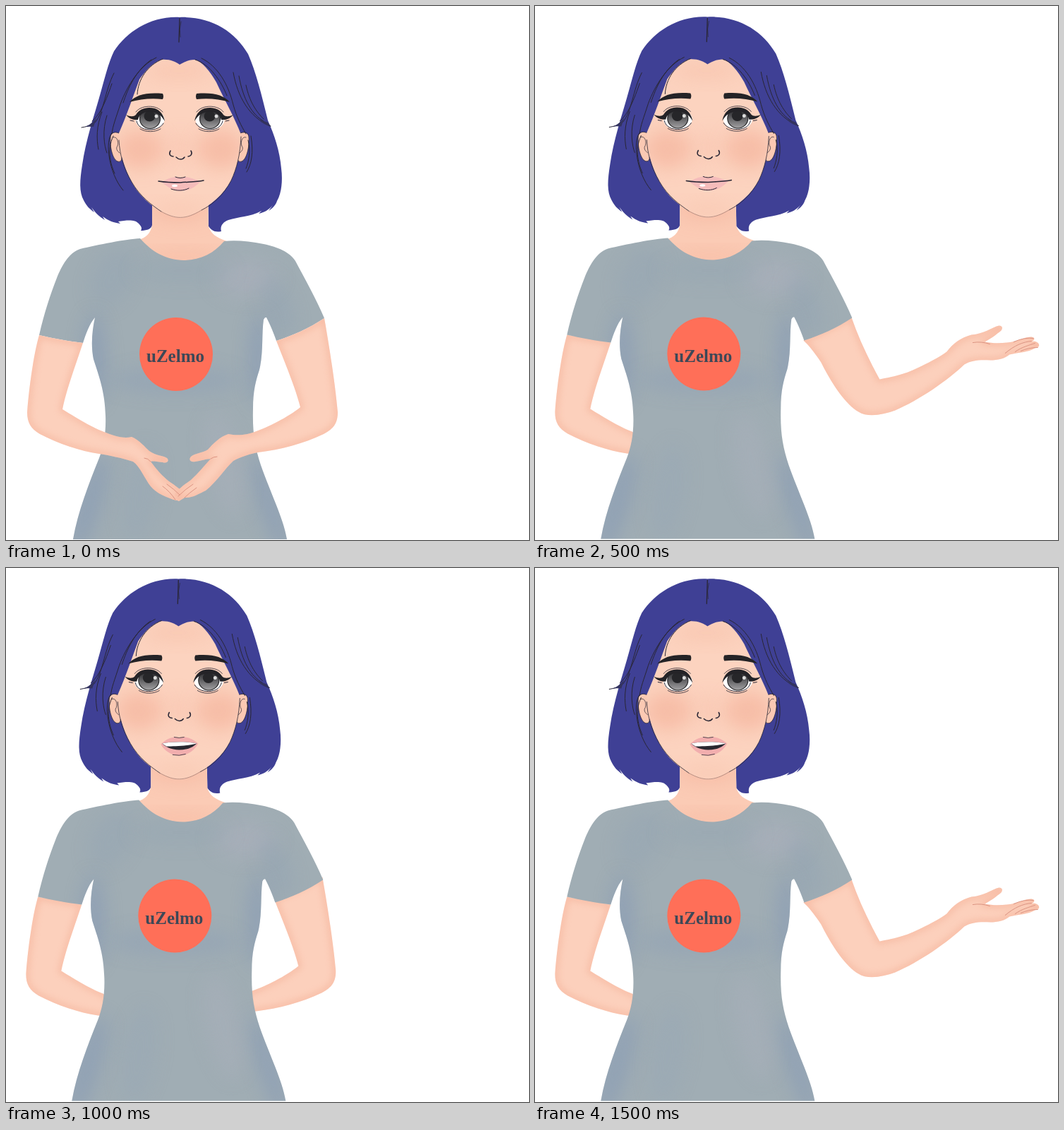
Animation of 741 by 756 pixels, one loop 1750 ms. Source, as an HTML page:

```html
<!DOCTYPE html>
<html lang="en">
<head>
<meta charset="utf-8">
<title>Presenter</title>
<style>
html, body { margin: 0; width: 100%; height: 100%; overflow: hidden; background: #fff; }
svg { display: block; width: 100%; height: 100%; }
.line { fill: none; stroke: #292634; stroke-linecap: round; stroke-linejoin: round; }
.crease { fill: none; stroke: #dc9482; stroke-width: 1; stroke-linecap: round; }
</style>
</head>
<body>
<svg id="stage" viewBox="0 0 741 756" preserveAspectRatio="none"></svg>
<script>
const stage = document.getElementById('stage');
const MIRROR = 'translate(492 0) scale(-1 1)';

const line = (d, width = 1) => `<path class="line" d="${d}" stroke-width="${width}"/>`;
const crease = d => `<path class="crease" d="${d}"/>`;
const fill = (d, color) => `<path d="${d}" fill="${color}"/>`;
const mirrored = art => art + `<g transform="${MIRROR}">${art}</g>`;
const glow = (x, y, rx, ry, color, opacity, turn = 0) =>
  `<ellipse cx="${x}" cy="${y}" rx="${rx}" ry="${ry}" fill="${color}" opacity="${opacity}"
    transform="rotate(${turn} ${x} ${y})" filter="url(#soft)"/>`;
const clipped = (id, d, base, inner) =>
  `<clipPath id="${id}"><path d="${d}"/></clipPath>${fill(d, base)}<g clip-path="url(#${id})">${inner}</g>`;
const skin = (id, d) => clipped(id, d, '#fcd0bc',
  `<path d="${d}" fill="none" stroke="#f3a98f" stroke-width="7" opacity=".55" filter="url(#edge)"/>`);

const hair = `M246 16C205 14 172 36 153 64C145 80 139 106 132 130C125 155 113 190 108 225
  C104 250 104 264 110 275C114 283 118 287 125 292L121 285C127 293 132 298 140 303L137 298
  C145 304 153 307 162 308L159 305C172 303 183 302 188 308C192 312 193 315 191 318C199 318 205 316 207 311
  L207 240H286L287 312C291 317 295 321 305 319C303 312 307 306 315 303C330 298 345 299 362 290L358 294
  C366 292 372 289 378 282L372 290C378 286 382 282 384 276C391 264 392 245 390 230
  C388 205 380 182 371 162C362 125 354 93 343 68C324 35 289 14 246 16Z`;
const neck = `M207 262V310C205 322 198 328 188 331C205 352 228 364 253 364C277 363 298 350 313 333
  C298 328 290 322 287 312L286 262Z`;
const face = `M246 83C240 79 232 75 220 76C207 80 196 94 189 104C180 128 171 155 160 180
  C160 203 166 227 178 249C190 272 213 289 233 297C243 301 251 301 260 297C284 287 307 270 319 247
  C327 230 332 210 333 182C324 158 308 130 298 108C289 92 278 79 268 76C258 76 252 80 246 83Z`;
const shirt = `M190 329C170 330 130 338 105 344C88 350 79 368 72 385C63 408 54 435 47 466
  C65 470 90 475 109 477C113 465 118 450 126 441C122 460 120 480 124 500C132 525 140 545 141 580
  C142 605 138 625 132 640C118 675 102 715 95 755H398C393 725 375 690 361 650C353 625 349 605 350 570
  C350 545 354 530 359 515C365 490 362 465 365 444Q367 440 369 441C374 450 380 465 383 474
  C405 467 430 456 451 442C440 416 424 387 410 361C403 349 385 341 365 337C345 333 325 331 309 333
  C295 350 275 360 252 360C225 359 207 348 190 329Z`;

const upperL = 'M109 477C98 510 85 545 80 571C95 580 120 596 139 603';
const outerL = 'C105 630 75 620 48 606C35 598 30 590 30 575C33 535 40 490 47 466';
const hemL = 'C65 470 90 475 109 477Z';
const upperR = 'M383 474C395 505 410 540 417 568C400 582 370 597 352 603';
const outerR = 'C390 628 420 620 450 606C465 598 470 590 470 575C466 530 456 470 451 442';
const hemR = 'C430 456 405 467 383 474Z';
const handL = `C152 608 165 613 178 610C190 615 196 624 203 630C213 637 222 636 228 640C232 644 228 648 222 646
  C213 645 208 644 205 645C214 657 222 666 231 673C240 679 247 684 251 689Q250 693 246 692Q249 699 241 700
  C228 696 213 690 205 680C197 670 190 652 180 645C165 640 145 636 132 634`;
const handR = `C345 606 330 609 315 606C303 610 294 619 286 628C278 633 268 633 262 638C258 643 262 646 268 645
  C276 644 284 641 290 641C280 652 272 662 262 671C252 678 243 685 239 691Q239 695 243 694Q240 700 245 701
  L253 696C264 697 274 690 283 686C300 672 310 655 322 644C335 637 347 634 357 632`;
const reaching = `M450 441C460 470 474 500 490 529C497 527 517 525 537 516C557 507 574 498 585 490
  C594 478 605 470 620 466C637 465 650 455 659 453C666 453 665 460 657 464C650 470 642 474 639 476
  C652 479 670 478 682 475C694 471 704 467 708 470C711 472 707 475 705 476C710 474 716 477 716 481
  C716 484 711 484 708 486C702 490 687 491 674 494C667 500 657 502 647 502C632 501 620 502 610 508
  C587 530 547 558 512 573C494 580 472 583 460 575C442 565 422 535 407 505C397 490 389 480 382 474Z`;

const eye = x => `
  <ellipse cx="${x}" cy="161" rx="20.5" ry="14.5" fill="#fff"/>
  <ellipse cx="${x}" cy="159.5" rx="14.5" ry="14" fill="url(#iris)" stroke="#29292b" stroke-width="1.2"/>
  <ellipse cx="${x - .5}" cy="156" rx="8" ry="7.5" fill="#262629"/>
  <circle cx="${x + 9}" cy="156" r="2.5" fill="#fff" opacity=".8"/>`;
const eyeLines =
  fill(`M170 154C176 157 181 157 184 154C189 145 200 142 211 145C219 148 223 154 225 163
    C220 155 214 150 205 150C196 149 189 153 187 161C180 162 174 159 170 154Z`, '#242327') +
  line('M184 150C190 141 212 138 222 150', .8) +
  line('M185 163C187 172 196 176 207 175C215 174 220 171 223 166') +
  line('M190 174C198 179 211 179 219 174', .8) +
  line('M176 162L181 163');
const ear = fill(`M162 181C156 177 149 179 148 185C147 200 151 217 158 220C164 222 165 216 164 208Z`, '#fbc9b3') +
  line('M160 180C153 177 148 180 148 186C147 200 151 217 158 220C162 221 164 219 164 215', .8) +
  line('M152 186C157 184 160 192 158 198C155 202 158 206 161 208', .7);

const strands = line('M246 18L245 51', 1.3) + line('M248 22Q245 33 247 44', .7) + [
  'M222 75C200 84 187 104 186 125', 'M213 73C190 84 172 112 162 139C156 158 151 170 150 181',
  'M206 76C184 91 173 116 166 137', 'M153 95C140 120 139 150 126 165C119 170 113 171 107 172',
  'M150 110C139 142 131 156 122 163', 'M136 150C128 170 128 188 131 203',
  'M143 155C136 176 139 198 143 208', 'M150 180C140 191 145 236 166 261', 'M152 184C142 205 149 226 154 237',
  'M268 76C288 82 305 106 313 127', 'M277 74C300 85 315 111 322 140C327 158 333 169 340 181',
  'M322 94C328 128 344 157 374 170', 'M330 99C336 133 349 154 365 163C369 168 372 169 375 170',
  'M340 112C345 136 355 150 365 160', 'M347 184C351 207 348 224 341 235', 'M343 190C347 205 344 220 340 230'
].map(d => line(d)).join('') +
  fill('M107 172Q118 171 128 159L124 171Q115 170 107 172Z', '#33335f') +
  fill('M375 170Q366 169 357 160L371 165Z', '#33335f');

const closedMouth =
  fill(`M220 249C230 245 237 240 247 243C256 240 264 245 276 248C267 258 257 262 247 262C237 262 229 256 220 249Z`, '#f5bcbb') +
  line('M216 248C229 250 238 250 247 250C258 249 270 249 280 247', 1.5) +
  line('M234 259C242 262 252 262 259 258', 1) + line('M240 242Q247 245 254 242', 1) +
  '<ellipse cx="239" cy="254.5" rx="4" ry="1.7" fill="#fff"/>';
const openMouth =
  fill(`M221 250C230 241 240 238 247 241C255 238 265 241 274 249C268 260 258 266 247 266C236 266 226 259 221 250Z`, '#f2aeae') +
  fill('M223 249C236 246 260 246 272 249C265 256 256 258 247 258C238 258 229 255 223 249Z', '#292830') +
  fill('M223 249C236 246 260 246 272 249C262 252 240 253 229 253Z', '#fff') +
  line('M240 240Q247 242 254 240', .8) + line('M238 265Q247 267 256 264', .8);

const shirtShade =
  glow(150, 385, 28, 45, '#8c9fb3', .25, 25) + glow(125, 500, 15, 65, '#8195b5', .55) +
  glow(358, 500, 13, 65, '#8195b5', .55) + glow(240, 530, 95, 18, '#8c9fb6', .45) +
  glow(340, 385, 45, 26, '#adb1be', .5) + glow(385, 425, 17, 45, '#8c9fb3', .35, -20) +
  glow(118, 705, 17, 75, '#8297b6', .5, 17) + glow(373, 705, 15, 75, '#8297b6', .5, -18) +
  glow(310, 650, 24, 75, '#aab0bc', .45, -12) + glow(190, 690, 24, 70, '#92a4b8', .25, 8) +
  glow(250, 375, 70, 14, '#93a4b2', .4);

stage.innerHTML = `
<defs>
  <filter id="soft" x="-100%" y="-100%" width="300%" height="300%"><feGaussianBlur stdDeviation="13"/></filter>
  <filter id="edge" x="-20%" y="-20%" width="140%" height="140%"><feGaussianBlur stdDeviation="5"/></filter>
  <linearGradient id="iris" x2="0" y2="1"><stop offset=".2" stop-color="#38383b"/><stop offset="1" stop-color="#a3a2a4"/></linearGradient>
</defs>
<g id="figure">
  ${fill(hair, '#3f4095')}
  ${clipped('neckClip', neck, '#fbcbb5', glow(247, 288, 45, 15, '#f3ae97', .5) + glow(250, 357, 60, 7, '#f4ae95', .6))}
  ${mirrored(ear)}
  ${clipped('faceClip', face, '#fcd3bf',
    glow(190, 203, 33, 27, '#f2a78f', .5) + glow(304, 203, 33, 27, '#f2a78f', .5) +
    glow(245, 92, 50, 10, '#f6b59d', .45) + glow(247, 200, 13, 20, '#f6b39d', .35) + glow(247, 290, 40, 8, '#f8bda5', .5))}
  ${line('M160 190C161 211 167 230 178 249C190 270 207 282 220 291', .8)}
  ${line('M333 185C332 210 327 230 319 247C308 268 293 281 277 289', .8)}
  <path d="M220 291C240 302 254 303 277 289" fill="none" stroke="#a88176" stroke-width=".8"/>
  ${strands}
  ${mirrored(fill('M175 136C184 126 198 122 222 124Q224 128 222 132C205 130 190 132 175 136Z', '#242326'))}
  ${eye(204)}${eye(289)}
  ${mirrored(eyeLines)}
  ${line('M233 205C230 210 233 213 237 213', 1.5)}
  ${line('M262 205C265 210 261 213 258 213', 1.5)}
  ${line('M241 214C245 218 250 218 253 214', 1.5)}
  <g id="closed">${closedMouth}</g>
  <g id="open">${openMouth}</g>
  <g id="backLeft">${skin('backL', upperL + 'L150 610L145 635L132 634' + outerL + 'Z')}</g>
  <g id="backRight">${skin('backR', upperR + 'L342 608L345 633L357 632' + outerR + 'Z')}</g>
  <g id="reach">${skin('reachR', reaching)}
    ${['M622 477Q634 475 646 479', 'M668 492C681 481 693 476 705 475', 'M682 490C692 483 701 481 710 478',
       'M690 489Q701 484 714 484', 'M680 476Q696 469 708 471'].map(crease).join('')}
  </g>
  ${clipped('shirtClip', shirt, '#a0adb4', shirtShade)}
  <circle cx="241" cy="493" r="52" fill="#ff6f58"/>
  <text x="240" y="504" text-anchor="middle" font-family="'Liberation Serif', serif" font-size="25" font-weight="700" fill="#3d4857">uZelmo</text>
  <g id="clasp">
    ${skin('claspL', upperL + handL + outerL + hemL)}${skin('claspR', upperR + handR + outerR + hemR)}
    ${['M222 680Q232 687 240 699', 'M228 677Q238 684 246 692', 'M265 677Q254 684 244 694', 'M270 682Q260 689 253 696',
       'M196 640Q201 640 205 645', 'M299 638Q294 638 290 641'].map(crease).join('')}
  </g>
</g>`;

const STEP = 250;
const poses = [
  { arms: 'clasp' },
  { arms: 'clasp', talking: true },
  { arms: 'reach', lean: true },
  { arms: 'reach', lean: true, talking: true },
  { arms: 'back', lean: true, talking: true },
  { arms: 'back' },
  { arms: 'reach', lean: true, talking: true }
];
const byId = id => document.getElementById(id);
const show = (id, on) => byId(id).setAttribute('display', on ? 'inline' : 'none');
const move = (id, x, y) => byId(id).setAttribute('transform', `translate(${x} ${y})`);

function render(time) {
  const { arms, lean, talking } = poses[Math.floor(time / STEP) % poses.length];
  move('figure', lean ? -1.7 : 0, lean ? -.5 : 0);
  move('backRight', lean ? -1 : 0, lean ? -4 : 0);
  show('open', talking);
  show('closed', !talking);
  show('clasp', arms === 'clasp');
  show('reach', arms === 'reach');
  show('backLeft', arms !== 'clasp');
  show('backRight', arms === 'back');
}

const start = performance.now();
function tick() {
  render(performance.now() - start);
  requestAnimationFrame(tick);
}
tick();
</script>
</body>
</html>
```
